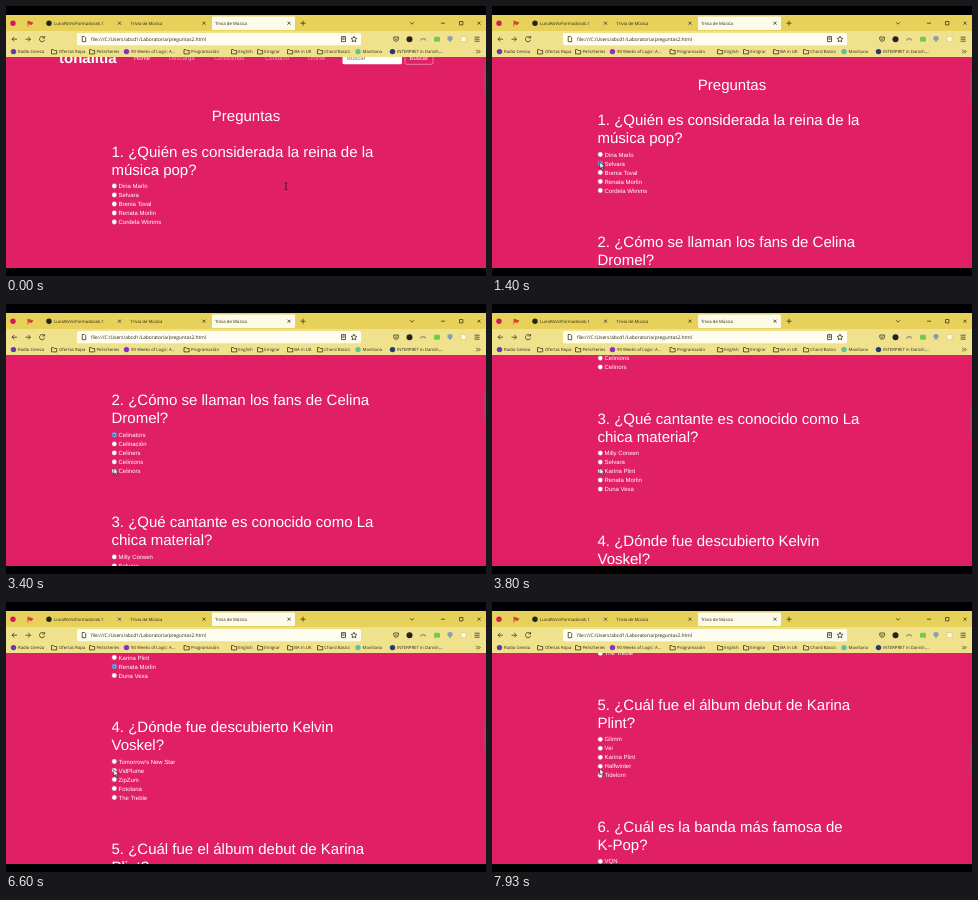
An HTML page that plays this animation: 480x270 px, repeating every 8000 ms.

```html
<!DOCTYPE html>
<html lang="es">
<head>
<meta charset="utf-8">
<title>Trivia de Música</title>
<style>
  html, body { margin: 0; width: 100%; height: 100%; overflow: hidden; background: #000; }
  svg { display: block; width: 100vw; height: 100vh; }
  text { text-rendering: geometricPrecision; white-space: pre; }
  #page text { font-family: "Liberation Sans", Arial, sans-serif; fill: #fff; }
  #chrome text { font-family: "Open Sans", sans-serif; font-size: 4.3px; fill: #29270f; }
  .line { fill: none; stroke: #3a3618; stroke-width: .8; }
</style>
</head>
<body>
<svg id="stage" viewBox="0 0 480 270">
  <clipPath id="viewport"><rect y="51" width="480" height="211"/></clipPath>
  <rect width="480" height="270"/>
  <g clip-path="url(#viewport)">
    <rect y="51" width="480" height="211" fill="#e11f64"/>
    <g id="page"></g>
    <rect id="thumb" x="477.8" width="1.4" height="30" rx=".7" fill="#b83f72"/>
    <path id="arrow" d="M0 0V6.6L1.6 5.2L2.7 7.6L3.7 7.1L2.7 4.8H4.7Z" fill="#fff" stroke="#111" stroke-width=".6"/>
    <path id="beam" d="M-1.4-3.2H1.4M0-3.2V3.2M-1.4 3.2H1.4" fill="none" stroke="#222" stroke-width=".8"/>
  </g>
  <g id="chrome"></g>
</svg>
<script>
const LOOP = 8000, STEP = 1000 / 15, BLOCK = 122;
const byId = id => document.getElementById(id);
const page = byId('page'), chrome = byId('chrome');

function add(parent, tag, attrs, content = '') {
  const el = document.createElementNS('http://www.w3.org/2000/svg', tag);
  for (const key in attrs) el.setAttribute(key, attrs[key]);
  el.textContent = content;
  parent.append(el);
  return el;
}
const label = (parent, x, y, content, attrs) => add(parent, 'text', { x, y, ...attrs }, content);
const box = (parent, x, y, width, height, fill, attrs) =>
  add(parent, 'rect', { x, y, width, height, fill, ...attrs });
const dot = (parent, cx, cy, r, fill, attrs) => add(parent, 'circle', { cx, cy, r, fill, ...attrs });
const line = d => add(chrome, 'path', { d, class: 'line' });

// Browser window
box(chrome, 0, 9, 480, 16, '#e7d15a');
box(chrome, 0, 25, 480, 26, '#f0e28d');
box(chrome, 206, 10.5, 83, 13.5, '#fcfae8', { rx: 1 });
dot(chrome, 7, 17.2, 2.7, '#d3185c');
add(chrome, 'path', { d: 'M21.5 14.5L27.5 16.5L25.5 19L22.3 18.2V20.5H21.5Z', fill: '#d8432b' });
dot(chrome, 43, 17.2, 2.7, '#24231c');
label(chrome, 48, 18.8, 'LunaRoVs/Formadora6.1');
label(chrome, 124.5, 18.8, 'Trivia de Música');
label(chrome, 209, 18.8, 'Trivia de Música');
for (const x of [113.5, 198, 283, 473]) line(`M${x - 1.5} 15.7l3 3m0-3l-3 3`);
line('M294.5 17.2h5m-2.5-2.5v5M404 16.2l2 2l2-2M435 17.2h4M453.5 15.5h3.4v3.4h-3.4Z');
line('M11 33.2H6m2.3-2.3L6 33.2l2.3 2.3M19.5 33.2h5m-2.3-2.3l2.3 2.3l-2.3 2.3');
line('M38 31.4a2.6 2.6 0 1 0 .6 2.4M38.6 30v2h-2');
box(chrome, 71, 27, 284, 12.2, '#fffdf0', { rx: 1.5 });
line('M76.2 30.5h2.3l1.2 1.2v4h-3.5Z');
label(chrome, 85, 34.9, 'file:///C:/Users/abcd1/Laboratoria/preguntas2.html', { style: 'font-size:4.85px' });
line('M335.5 30.6h4v5h-4ZM336.4 32h2.2m-2.2 1.2h2.2');
line('M348 30.2l.9 1.9l2 .3l-1.5 1.4l.4 2l-1.8-1l-1.8 1l.4-2l-1.5-1.4l2-.3Z');
line('M387.8 31h4.6v2a2.3 2.3 0 0 1-4.6 0ZM389 32.6l1.1 1l1.1-1');
dot(chrome, 403.5, 33.2, 3, '#222');
add(chrome, 'path', { d: 'M414.5 34.5a2.7 2.7 0 0 1 5.2 0', fill: 'none', stroke: '#98957c', 'stroke-width': 1.2 });
box(chrome, 428, 30.7, 6, 5, '#75cc45', { rx: 1 });
add(chrome, 'path', { d: 'M441.5 30.8L444 30l2.5.8v2.4L444 36.3l-2.5-3.1Z', fill: '#8b9db4' });
box(chrome, 455, 30.8, 5, 5, '#fffbe0', { stroke: '#c9bd72', 'stroke-width': .5 });
line('M468.6 31.2h5m-5 2h5m-5 2h5');

// [icon x, text x, name, icon colour]; without a colour the icon is a folder
const bookmarks = [
  [7.5, 12, 'Radio Cereza', '#6a35b5'], [48, 53, 'Ofertas Ropa'], [86, 90.5, 'Pelis/Series'],
  [120.5, 125, '90 Weeks of Logic: A...', '#8a2fc4'], [180.5, 185, 'Programación'],
  [228, 232.3, 'English'], [254, 258.3, 'Emigrar'], [284, 288.3, 'BA in UK'],
  [314, 318.3, 'Chord Basics'], [352, 356.5, 'MoviSana', '#5fc0a0'],
  [386.5, 391, 'INTERPRET in Danish,...', '#243b70']
];
for (const [x, textX, name, color] of bookmarks) {
  if (color) dot(chrome, x, 45.6, 2.7, color);
  else line(`M${x - 2.5} 43.6h2l.8 .9h2.4v3.4h-5.2Z`);
  label(chrome, textX, 47.1, name);
}
line('M470.2 43.9l1.7 1.7l-1.7 1.7m2.2-3.4l1.7 1.7l-1.7 1.7');

// Page content, in coordinates of the unscrolled page
label(page, 53, 57, 'tonalitia', { 'font-size': 15, 'font-weight': 'bold' });
[[128, 'Home'], [163, 'Descarga'], [208, 'Conócenos'], [259, 'Contacto'], [302, 'Unirse']].forEach(
  ([x, name], i) => label(page, x, 54, name, { 'font-size': 6, opacity: i ? .55 : .9 }));
box(page, 336.5, 44, 59.5, 14.3, '#fff', { rx: 1.5 });
label(page, 341, 53.6, 'Buscar', { 'font-size': 6, style: 'fill:#777' });
box(page, 399, 44, 28, 14.3, 'none', { rx: 1.5, stroke: '#f8d5e2', 'stroke-width': .5 });
label(page, 403.5, 53.6, 'Buscar', { 'font-size': 6 });
label(page, 240, 115, 'Preguntas', { 'font-size': 15, 'text-anchor': 'middle' });

// Each question: two heading lines, options, chosen option and time of the choice
const questions = [
  ['1. ¿Quién es considerada la reina de la', 'música pop?',
    ['Dina Marlo', 'Selvara', 'Brenia Toval', 'Renata Morlin', 'Cordela Wimms'], 1, 1400],
  ['2. ¿Cómo se llaman los fans de Celina', 'Dromel?',
    ['Celinators', 'Celinación', 'Celiners', 'Celinions', 'Celinors'], 0, 3070],
  ['3. ¿Qué cantante es conocido como La', 'chica material?',
    ['Milly Corwen', 'Selvara', 'Karina Plint', 'Renata Morlin', 'Duna Vexa'], 3, 4530],
  ['4. ¿Dónde fue descubierto Kelvin', 'Voskel?',
    ["Tomorrow's New Star", 'VidPlume', 'ZipZum', 'Fotolaria', 'The Treble'], 1, 6870],
  ['5. ¿Cuál fue el álbum debut de Karina', 'Plint?',
    ['Glimm', 'Vei', 'Karina Plint', 'Halfwinter', 'Tidelorn']],
  ['6. ¿Cuál es la banda más famosa de', 'K-Pop?', ['VQN']]
];
const choices = [];
questions.forEach(([first, second, options, chosen, time], i) => {
  const top = 150.5 + BLOCK * i;
  label(page, 105.5, top, first, { 'font-size': 15 });
  label(page, 105.5, top + 18, second, { 'font-size': 15 });
  options.forEach((name, k) => {
    const y = top + 29.5 + 9 * k;
    dot(page, 108.3, y, 2.4, '#fff', { stroke: '#a5839a', 'stroke-width': .4 });
    label(page, 112.5, y + 2.2, name, { 'font-size': 6 });
    if (k === chosen) {
      const mark = add(page, 'g', {});
      dot(mark, 108.3, y, 2.1, '#fff', { stroke: '#1268c8', 'stroke-width': .8 });
      dot(mark, 108.3, y, 1.2, '#1268c8');
      choices.push({ mark, time });
    }
  });
});

// Motion: [start, duration, end values]
const clamp = v => Math.min(1, Math.max(0, v));
const easeOut = p => 1 - (1 - p) ** 4.3;
const smooth = p => p * p * (3 - 2 * p);
const scrolls = [[20, 850, [31.5]], [1550, 850, [138.5]], [3350, 850, [280.5]], [4820, 850, [386.5]], [6820, 850, [530.7]]];
const moves = [[900, 400, [107.8, 156]], [2450, 480, [107.8, 164]], [4230, 440, [107.8, 175]],
  [5700, 630, [107.8, 168.5]], [6450, 150, [107.8, 167.5]], [7700, 200, [107.8, 166.5]]];

function follow(track, from, t, ease) {
  return track.reduce((now, [start, length, to]) => {
    const p = ease(clamp((t - start) / length));
    return now.map((v, i) => v + (to[i] - v) * p);
  }, from);
}

function draw(now) {
  const t = Math.floor((now % LOOP + 4) / STEP) * STEP;
  const [scroll] = follow(scrolls, [0], t, easeOut);
  const pointer = follow(moves, [280, 180.3], t, smooth);
  page.setAttribute('transform', `translate(0 ${-scroll})`);
  byId('thumb').setAttribute('y', 60 + scroll * .155);
  const onBeam = t < 900;
  for (const [id, shown] of [['beam', onBeam], ['arrow', !onBeam]]) {
    byId(id).setAttribute('transform', `translate(${pointer})`);
    byId(id).style.display = shown ? '' : 'none';
  }
  for (const { mark, time } of choices) mark.style.display = t + 5 >= time ? '' : 'none';
}

const began = performance.now();
function tick() {
  draw(performance.now() - began);
  requestAnimationFrame(tick);
}
tick();
</script>
</body>
</html>
```
